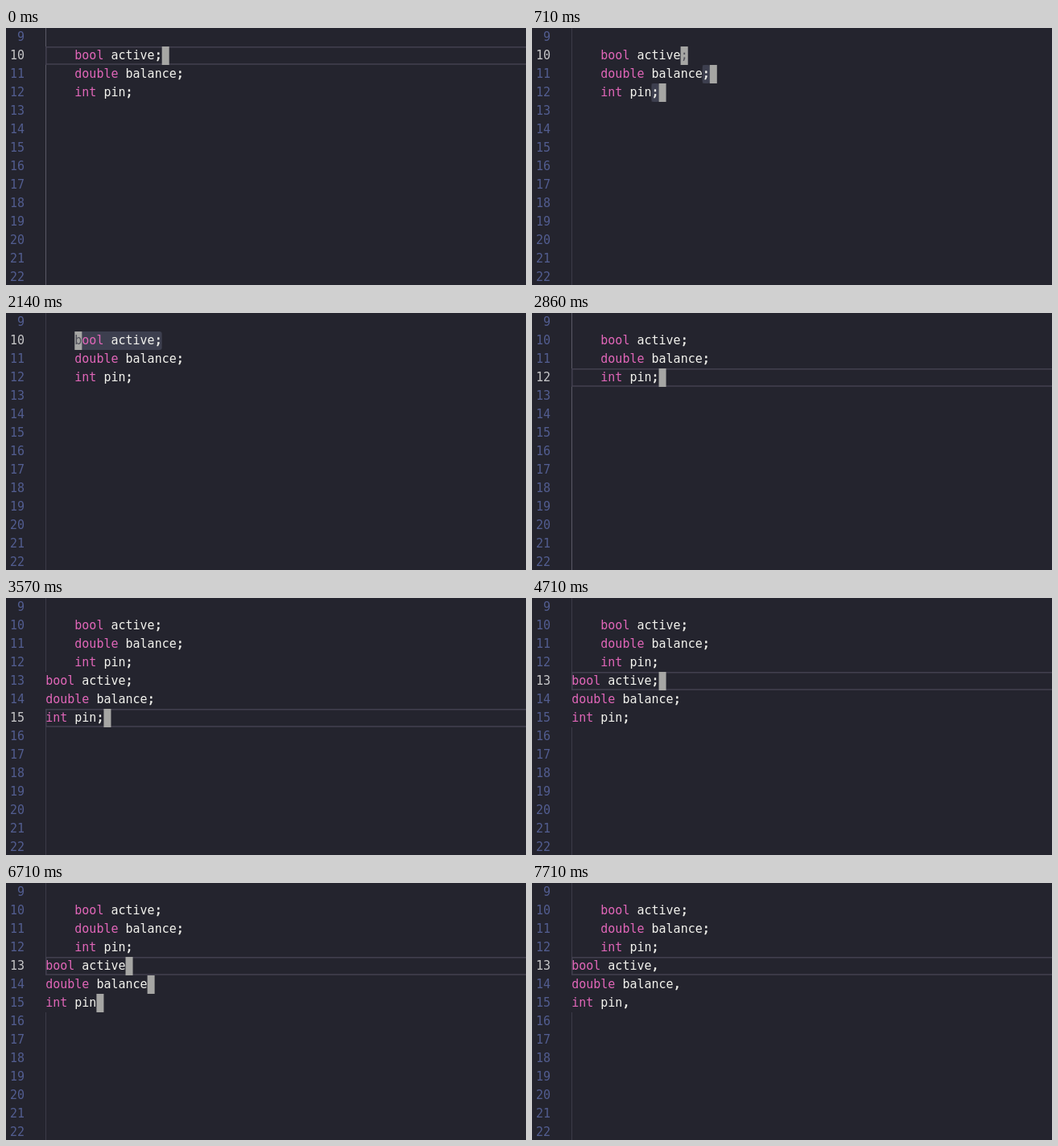
An HTML page that plays this animation: 646x320 px, repeating every 8000 ms.

```html
<!DOCTYPE html>
<html lang="en">
<head>
<meta charset="utf-8">
<title>Multi-cursor editing</title>
<style>
html, body { margin: 0; width: 100%; height: 100%; overflow: hidden; background: #24242e; }
svg { display: block; width: 646px; height: 320px; }
text { font: 15px "DejaVu Sans Mono", "Liberation Mono", monospace; white-space: pre; fill: #f3f3ee; }
.num { fill: #525d90; }
.now { fill: #c6c6c8; }
.key { fill: #e066b8; }
.end { stroke: #f3f3ee; stroke-width: .5px; }
.sel { fill: #3d3f4f; }
.same { fill: #33343f; }
.cur { fill: #a6a6a4; }
.under { fill: #50505a; }
.box { fill: none; stroke: #413f4e; stroke-width: 1.6px; }
.guide { fill: #3c3b48; }
.guide.lit { fill: #5a5966; }
</style>
</head>
<body>
<svg id="view" viewBox="0 0 646 320"></svg>
<script>
const LOOP = 8000, ROW = 23, CH = 9.03, LEFT = 49.2, FIRST = 9, LAST = 22;
const WORDS = [['bool', 'active'], ['double', 'balance'], ['int', 'pin']];
const view = document.getElementById('view');

const rowY = line => (line - FIRST) * ROW;
const colX = col => LEFT + col * CH;

// cursors: [line, column]; selections: [line, from, to]
const ends = [[10, 16], [11, 19], [12, 12]];
const semis = ends.map(([l, c]) => [l, c - 1, c]);
const starts = ends.map(([l]) => [l, 4]);
const full = ends.map(([l, c]) => [l, 4, c]);
const ends2 = [[13, 12], [14, 15], [15, 8]];
const semis2 = ends2.map(([l, c]) => [l, c - 1, c]);
const cut = ends2.map(([l, c]) => [l, c - 1]);
const pick = (cur, n) => [[cur[0][0], cur[0][1] - 1], ...cur.slice(1, n)];

// time, pasted line ending (null before the paste), cursors, selections, cursor shown
const STEPS = [
  [0, null, [ends[0]]],
  [140, null, pick(ends, 1), semis.slice(0, 1)],
  [430, null, pick(ends, 2), semis.slice(0, 2)],
  [710, null, pick(ends, 3), semis],
  [1000, null, ends],
  [1290, null, starts, full],
  [1860, null, starts, full, false],
  [2140, null, [starts[0]], [full[0]]],
  [2290, null, [ends[0]]],
  [2570, null, [[11, 16]]],
  [2860, null, [ends[2]]],
  [3140, null, [[13, 0]]],
  [3570, ';', [[15, 8]]],
  [4000, ';', [[14, 8]]],
  [4290, ';', [[13, 8]]],
  [4710, ';', [ends2[0]]],
  [5000, ';', pick(ends2, 1), semis2.slice(0, 1)],
  [5290, ';', pick(ends2, 2), semis2.slice(0, 2)],
  [5430, ';', pick(ends2, 3), semis2],
  [5710, ';', ends2],
  [6140, ';', ends2, [], false],
  [6570, '', cut],
  [7000, ',', ends2],
  [7570, ',', ends2, [], false]
];

function codeLine(line, mark) {
  const old = line < 13;
  const words = WORDS[line - (old ? 10 : 13)];
  if (!words || (!old && mark === null)) return null;
  return { indent: old ? 4 : 0, key: words[0], name: words[1], end: old ? ';' : mark };
}

const rect = (cls, line, from, to, r) =>
  `<rect class="${cls}" x="${colX(from)}" y="${rowY(line)}" width="${(to - from) * CH}" height="${ROW}" rx="${r}"/>`;
const label = (cls, x, line, body) =>
  `<text class="${cls}" x="${x}" y="${rowY(line) + 16}">${body}</text>`;

function draw([, mark, cursors, sels = [], shown = true]) {
  const active = cursors[0][0];
  const lit = mark === null && !sels.length ? ' lit' : '';
  const picking = sels.length && sels[0][2] - sels[0][1] === 1;
  let back = '', text = '', front = '';

  for (let line = FIRST; line <= LAST; line++) {
    const num = String(line);
    text += label(line === active ? 'now' : 'num', 23 - num.length * CH, line, num);
    const code = codeLine(line, mark);
    if (!code || code.indent)
      back += `<rect class="guide${lit}" x="49" y="${rowY(line)}" width="1" height="${ROW}"/>`;
    if (!code) continue;
    const { indent, key, name, end } = code;
    const len = indent + key.length + name.length + 2;
    if (picking) back += rect('same', line, len - 1, len, 0);
    text += label('', colX(indent), line,
      `<tspan class="key">${key}</tspan> ${name}<tspan class="end">${end}</tspan>`);
  }

  for (const [line, from, to] of sels) back += rect('sel', line, from, to, 3);
  if (!sels.length)
    back += `<rect class="box" x="49.8" y="${rowY(active) + .8}" width="610" height="${ROW - 1.8}"/>`;

  if (shown) for (const [line, col] of cursors) {
    front += rect('cur', line, col, col + 1, 0);
    const code = codeLine(line, mark);
    const row = code ? ' '.repeat(code.indent) + code.key + ' ' + code.name + code.end : '';
    if (row[col]) front += label('under', colX(col), line, row[col]);
  }
  view.innerHTML = back + text + front;
}

let last = null;
const begin = performance.now();
function tick() {
  const t = (performance.now() - begin) % LOOP;
  const step = STEPS.filter(s => s[0] <= t + 1).pop();
  if (step !== last) draw(last = step);
  requestAnimationFrame(tick);
}
tick();
</script>
</body>
</html>
```
